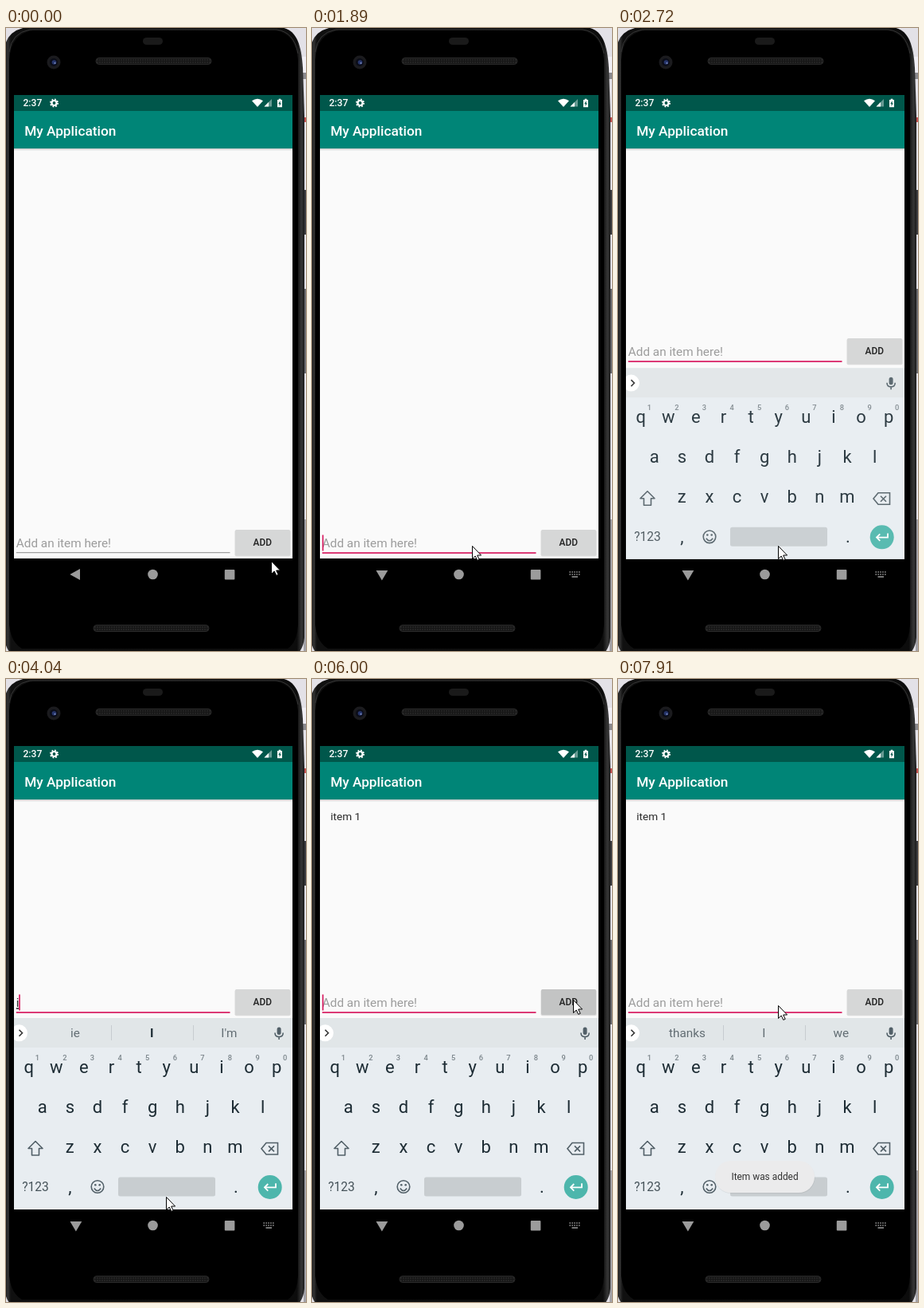
These frames come from a looping animation (377 by 781 pixels, 8000 ms). An HTML page:

```html
<!DOCTYPE html>
<html lang="en">
<head>
<meta charset="utf-8">
<title>Item list</title>
<style>
html, body { margin: 0; width: 100%; height: 100%; overflow: hidden; background: #e9e7ec; }
svg { display: block; width: 377px; height: 781px; font-family: Roboto, sans-serif; }
text { white-space: pre; }
.mid { text-anchor: middle; }
.med { font-weight: 500; }
.line { fill: none; stroke: #526068; stroke-width: 1.6; }
.off { display: none; }
#cursor { animation: travel 8s infinite; }
#kbd { animation: rise 8s step-end infinite; }
#toast { animation: pop 8s step-end infinite; }

/* percent = ms / 80 */
@keyframes travel {
  0% { transform: translate(333px, 668px); }
  1.5% { transform: translate(333px, 668px); animation-timing-function: steps(8, start); }
  14.93% { transform: translate(203px, 648px); animation-timing-function: step-end; }
  15.12%, 61.36% { transform: translate(201px, 649px); animation-timing-function: step-end; }
  61.37% { transform: translate(201px, 649px); animation-timing-function: steps(3, start); }
  66.6% { transform: translate(371px, 426px); animation-timing-function: step-end; }
  66.75% { transform: translate(371px, 426px); animation-timing-function: steps(4, start); }
  73.2% { transform: translate(328px, 402px); animation-timing-function: step-end; }
  78.2% { transform: translate(328px, 402px); animation-timing-function: steps(5, start); }
  85.5% { transform: translate(357px, 379px); animation-timing-function: step-end; }
  89.25% { transform: translate(338px, 361px); animation-timing-function: step-end; }
  90.87% { transform: translate(338px, 361px); animation-timing-function: steps(6, start); }
  100% { transform: translate(201px, 409px); }
}
@keyframes rise {
  0% { transform: translateY(41px); opacity: 0; }
  32.5% { transform: translateY(41px); opacity: .5; }
  34% { transform: translateY(1.3px); opacity: .93; }
  35.5%, 100% { transform: none; opacity: 1; }
}
@keyframes pop {
  0% { opacity: 0; }
  85.5% { opacity: .16; }
  87.37% { opacity: .8; }
  89.25%, 100% { opacity: 1; }
}
</style>
</head>
<body>
<svg viewBox="0 0 377 781">
  <defs>
    <linearGradient id="rim" gradientUnits="userSpaceOnUse" x1="0" x2="375">
      <stop offset="0" stop-color="#1c1c1c"/>
      <stop offset=".006" stop-color="#343434"/>
      <stop offset=".016" stop-color="#101010"/>
      <stop offset=".975" stop-color="#0c0c0c"/>
      <stop offset=".99" stop-color="#363636"/>
      <stop offset="1" stop-color="#1c1c1c"/>
    </linearGradient>
    <linearGradient id="shade" x2="0" y2="1">
      <stop offset="0" stop-color="#000" stop-opacity=".2"/>
      <stop offset="1" stop-color="#000" stop-opacity="0"/>
    </linearGradient>
    <pattern id="mesh" width="3" height="3" patternUnits="userSpaceOnUse">
      <rect width="3" height="3" fill="#161616"/>
      <circle cx="1" cy="1" r=".8" fill="#343434"/>
    </pattern>
    <clipPath id="screen"><rect x="10" y="84" width="350" height="622"/></clipPath>
  </defs>

  <!-- backdrop slivers -->
  <rect width="377" height="781" fill="#e3e1e7"/>
  <rect x="370" y="36" width="7" height="20" fill="#f1eff5"/>
  <rect x="372" y="56" width="5" height="8" fill="#8b8a8e"/>
  <rect x="374" y="112" width="3" height="6" fill="#c4504f"/>
  <rect x="374" y="203" width="3" height="56" fill="#3c3c40"/>
  <rect x="374" y="327" width="3" height="106" fill="#6b6b6f"/>
  <rect x="374" y="616" width="3" height="165" fill="#a3a2a7"/>

  <!-- phone -->
  <path d="M-2 26Q1 3 26-1H344C364 1 371 18 373 50L375 110V764Q374 776 368 783H5Q-1 776-2 764Z" fill="url(#rim)"/>
  <path d="M4 40Q6 7 34 3H338Q363 6 367 40V748Q366 770 354 778H20Q6 770 4 748Z" fill="#000"/>
  <path d="M4 30Q7 6 30 2H340Q362 5 367 32" fill="none" stroke="#363636"/>
  <rect x="172" y="12" width="25" height="9" rx="4.5" fill="#1a1a1a"/>
  <circle cx="60" cy="43" r="8.5" fill="#1b1b1e"/>
  <circle cx="60" cy="43" r="5" fill="#0b0d18"/>
  <circle cx="60.5" cy="43" r="2.8" fill="#26356b"/>
  <circle cx="61.5" cy="44" r="1" fill="#7f8fc4"/>
  <rect x="113" y="37.5" width="145" height="8" rx="4" fill="url(#mesh)" stroke="#2b2b2b"/>
  <rect x="110" y="748.5" width="145" height="8" rx="4" fill="url(#mesh)" stroke="#2b2b2b"/>

  <g clip-path="url(#screen)">
    <rect x="10" y="84" width="350" height="581" fill="#fafafa"/>
    <rect x="10" y="84" width="350" height="20" fill="#00574b"/>
    <rect x="10" y="104" width="350" height="47" fill="#008577"/>
    <rect x="10" y="151" width="350" height="3" fill="url(#shade)"/>
    <text class="med" x="21.5" y="98.2" font-size="12.1" fill="#fff">2:37</text>
    <g fill="none" stroke="#fff">
      <circle cx="60.5" cy="94" r="3" stroke-width="2.2"/>
      <circle cx="60.5" cy="94" r="4.6" stroke-width="1.8" stroke-dasharray="1.8 1.81"/>
    </g>
    <g fill="#fff">
      <path d="M309 91.2Q316 86.2 323 91.2L316 99Z"/>
      <path d="M334 89V98.5H324.5Z" opacity=".4"/>
      <path d="M330 93V98.5H324.5Z"/>
      <path d="M341 90H342.7V88.7H345.3V90H347V99.3H341Z"/>
    </g>
    <path d="M344.6 91.2L342.3 95H343.6V98L345.8 94.2H344.6Z" fill="#00574b"/>
    <text class="med" x="23.2" y="134.5" font-size="17.3" fill="#fff">My Application</text>
    <text id="item" x="23.2" y="177.2" font-size="13.6" fill="#2b2b2b">item 1</text>

    <!-- input row, drawn at its upper place -->
    <g id="row">
      <text id="hint" x="12.8" y="411.3" font-size="15.3" fill="#9c9c9c">Add an item here!</text>
      <text id="typed" x="12.8" y="411.3" font-size="15.3" fill="#2b2b2b"></text>
      <rect id="rule" x="12.8" y="417.2" width="268.7"/>
      <rect id="caret" y="395.5" width="1.7" height="20" fill="#d81b60"/>
      <rect x="287.5" y="389.5" width="70" height="32.8" rx="2" fill="#000" opacity=".13"/>
      <rect id="btn" x="288" y="389" width="69" height="32" rx="1.7"/>
      <text class="mid med" x="322.3" y="409.2" font-size="11.9" fill="#222">ADD</text>
    </g>

    <g id="kbd">
      <rect x="10" y="425" width="350" height="240" fill="#e8edf1"/>
      <rect x="10" y="425" width="350" height="37" fill="#e1e6e8"/>
      <circle cx="16.5" cy="443.8" r="10.5" fill="#fff"/>
      <path d="M16.5 439.8L20.5 443.8L16.5 447.8" class="line" style="stroke:#333"/>
      <g id="words" font-size="15.3" fill="#626d73">
        <path d="M132.5 434V453M235.5 434V453" stroke="#c7ccd0"/>
        <text class="mid" x="87" y="449.3"></text>
        <text class="mid" x="183.3" y="449.3"></text>
        <text class="mid" x="280.3" y="449.3"></text>
      </g>
      <rect x="340.6" y="436.5" width="5" height="9.5" rx="2.5" fill="#526068"/>
      <path class="line" d="M338 443.5Q338 448.6 343.1 448.6T348.2 443.5M343.1 448.6V452"/>
      <g id="keys" font-size="22" fill="#1d2c34"></g>
      <path class="line" d="M37 579.5L46 588.5H41.5V597H32.5V588.5H28Z" stroke-linejoin="round"/>
      <path class="line" d="M327 581.5H341.5V596H327L321 588.8ZM330 585.4L337 592.4M337 585.4L330 592.4"/>
      <text class="mid" x="37" y="642.2" font-size="15.6" fill="#46535a">?123</text>
      <circle class="line" cx="115" cy="636.5" r="7.8"/>
      <path class="line" d="M110.8 638.5Q115 644.5 119.2 638.5"/>
      <circle cx="112.3" cy="634.2" r="1.3" fill="#526068"/>
      <circle cx="117.7" cy="634.2" r="1.3" fill="#526068"/>
      <rect x="141" y="624.5" width="122" height="24" rx="2.5" fill="#c8cdd0"/>
      <circle cx="331.7" cy="637" r="15" fill="#4db6ac"/>
      <path d="M339 632.3V637.3H325M329.3 633L325 637.3L329.3 641.6" fill="none" stroke="#fff" stroke-width="1.8"/>
    </g>

    <g id="toast">
      <rect x="122" y="605" width="125.5" height="40" rx="20" fill="#000" opacity=".06"/>
      <rect x="122" y="604" width="125" height="40" rx="20" fill="#ebebec"/>
      <text class="mid" x="184.5" y="628" font-size="11.9" fill="#333">Item was added</text>
    </g>
  </g>

  <!-- navigation -->
  <g fill="#9b9b9b">
    <path id="back"/>
    <circle cx="184.5" cy="685" r="6.3"/>
    <rect x="274.8" y="679" width="12.6" height="12.6" rx="1"/>
    <g id="kbicon" fill="none" stroke="#9b9b9b" stroke-width="1.5">
      <path d="M323.5 682H337M323.5 685H337" stroke-dasharray="1.5 1.4"/>
      <path d="M326.5 688H334"/>
    </g>
  </g>

  <g id="cursor" stroke="#000" stroke-width="1">
    <path id="arrow" d="M.5.5V16.5L4.2 13L6.8 18.4L9.2 17.3L6.7 12H11.6Z" fill="#fff"/>
    <path id="beam" d="M-3-7.5H-1L.5-6.5L2-7.5H4M.5-6.5V7M-3 8H-1L.5 7L2 8H4" fill="none" stroke-width="1.3"/>
  </g>
</svg>
<script>
const LOOP = 8000;
const $ = id => document.getElementById(id);
const key = (x, y, s, extra = '') => `<text class="mid" x="${x}" y="${y}" ${extra}>${s}</text>`;

const rows = [['qwertyuiop', 28.7, 494], ['asdfghjkl', 45.8, 544.2], ['zxcvbnm', 80.3, 594.2]];
let keys = key(80.5, 644, ',') + key(289, 644, '.');
for (const [letters, x, y] of rows)
  [...letters].forEach((c, i) => keys += key(x + 34.6 * i, y, c));
for (let i = 0; i < 10; i++)
  keys += key(39.3 + 34.6 * i, 477.6, (i + 1) % 10, 'font-size="9.3" font-weight="500" fill="#7b858b"');
$('keys').innerHTML = keys;

// value of a stepped track at time t
const at = (t, track) => track.reduce((v, [start, next]) => t >= start ? next : v, track[0][1]);
const show = (id, on) => $(id).classList.toggle('off', !on);

const typing = [[0, ''], [3640, 'i'], [4160, 'it'], [4310, 'ite'], [4450, 'item'],
  [4600, 'item '], [4910, 'item 1'], [6000, '']];
const caret = [[0, 0], [1060, 1], [1330, 0], [1890, 1], [2320, 0], [2960, 1], [3360, 0],
  [3640, 1], [5470, 0], [6000, 1], [6500, 0], [6990, 1], [7530, 0]];
const words = [[0, null], [3770, ['ie', 'I', "I'm", 1]], [4160, ["it's", 'it', 'its', 1]],
  [4450, ['items', 'item', 'iter', 1]], [4910, null], [7270, ['thanks', 'I', 'we', 0]]];
const slots = document.querySelectorAll('#words text');

function draw(t) {
  const text = at(t, typing), sugg = at(t, words);
  const focus = t >= 1060, ime = t >= 1890;

  $('typed').textContent = text;
  $('typed').style.textDecoration = text.length < 5 ? 'underline' : 'none';
  show('hint', !text);
  show('caret', at(t, caret));
  $('caret').setAttribute('x', 12.8 + (text ? $('typed').getComputedTextLength() - .4 : 0));
  $('rule').setAttribute('height', focus ? 1.7 : 1);
  $('rule').setAttribute('fill', focus ? '#d81b60' : '#8a8a8a');
  $('row').setAttribute('transform', `translate(0 ${t < 2170 ? 240 : 0})`);
  $('btn').setAttribute('fill', t >= 5850 && t < 6130 ? '#c3c4c4' : '#d6d7d7');
  show('item', t >= 6000);

  show('words', sugg);
  if (sugg) {
    slots.forEach((el, i) => el.textContent = sugg[i]);
    slots[1].style.fontWeight = sugg[3] ? 700 : 400;
    slots[1].style.fill = sugg[3] ? '#1d2c34' : '';
  }

  $('back').setAttribute('d', ime ? 'M80.5 680H95.3L87.9 692.5Z' : 'M80.3 685L93 678V692Z');
  show('kbicon', ime);
  const beam = t >= 6700 && t < 7140;
  show('beam', beam);
  show('arrow', !beam);
}

let start;
function tick(now) {
  start ??= now;
  draw((now - start) % LOOP);
  requestAnimationFrame(tick);
}
draw(0);
requestAnimationFrame(tick);
</script>
</body>
</html>
```
